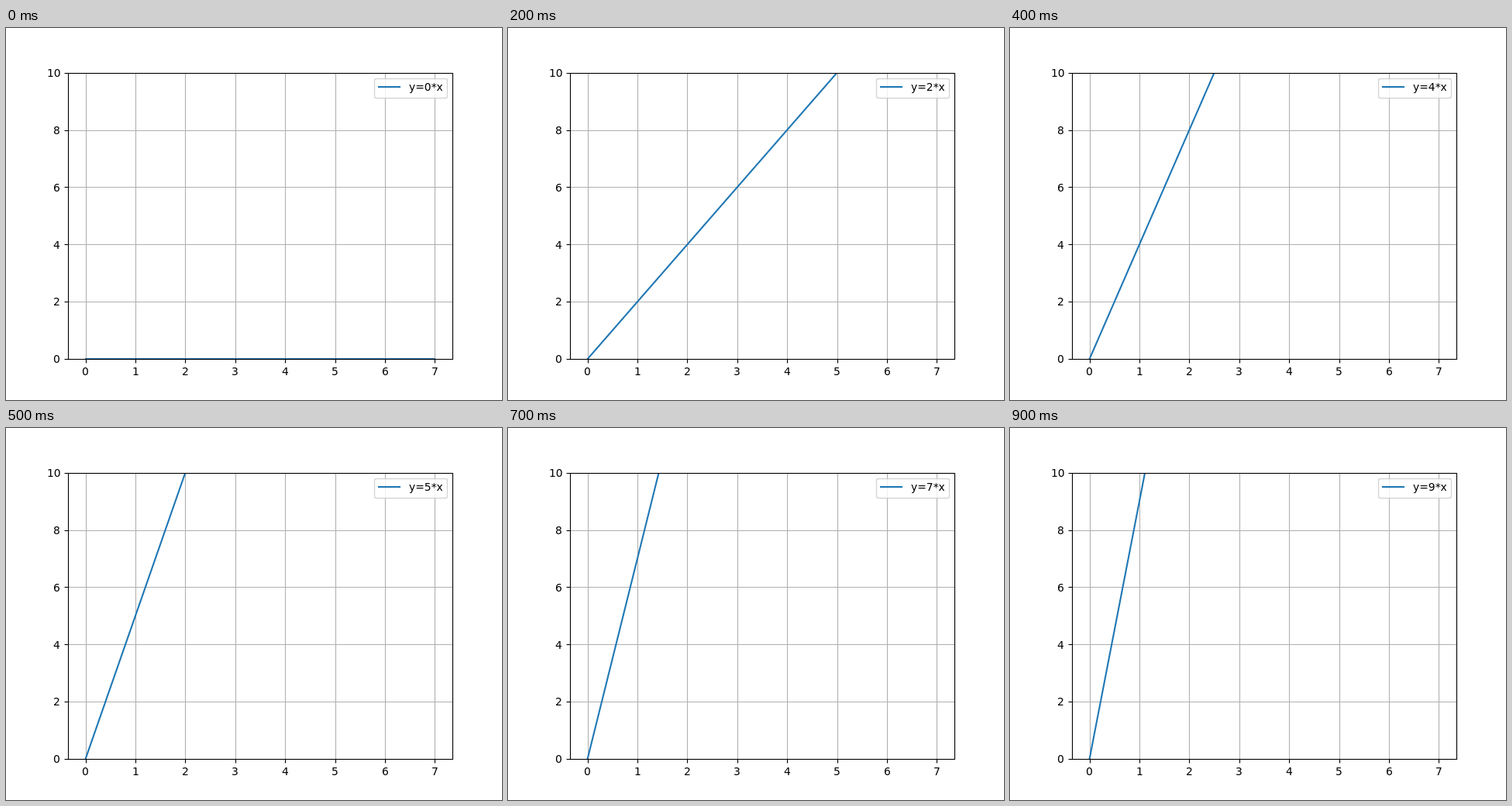
An HTML page with a canvas that plays this animation: 640x480 px, repeating every 1000 ms.

```html
<!DOCTYPE html>
<html lang="en">
<head>
<meta charset="utf-8">
<title>Slope of a line</title>
<style>
  html, body { margin: 0; width: 100%; height: 100%; overflow: hidden; background: #fff; }
  canvas { display: block; }
</style>
</head>
<body>
<canvas id="plot" width="640" height="480"></canvas>
<script>
const ctx = document.getElementById('plot').getContext('2d');
const PT = 100 / 72;
const STEP = 100, SLOPES = 10;
const BLUE = '#1f77b4';
const box = { left: 80, right: 576, top: 57.6, bottom: 427.2 };

const px = x => box.left + (x + 0.35) / 7.7 * (box.right - box.left);
const py = y => box.bottom - y / 10 * (box.bottom - box.top);
const snap = v => Math.round(v) + 0.5;

function line(x1, y1, x2, y2, color, width, cap = 'butt') {
  ctx.strokeStyle = color;
  ctx.lineWidth = width * PT;
  ctx.lineCap = cap;
  ctx.beginPath();
  ctx.moveTo(x1, y1);
  ctx.lineTo(x2, y2);
  ctx.stroke();
}

function text(str, x, y) {
  ctx.fillStyle = '#000';
  ctx.fillText(str, Math.round(x), Math.round(y));
}

function clipToAxes(draw) {
  ctx.save();
  ctx.beginPath();
  ctx.rect(80, 58, 497, 370);
  ctx.clip();
  draw();
  ctx.restore();
}

function grid() {
  for (let x = 0; x <= 7; x++) line(snap(px(x)), 58, snap(px(x)), 428, '#b0b0b0', 0.8);
  for (let y = 0; y <= 10; y += 2) line(80, snap(py(y)), 577, snap(py(y)), '#b0b0b0', 0.8);
}

function graph(k) {
  if (k === 0) line(Math.round(px(0)), 427, Math.round(px(7)), 427, BLUE, 1.5, 'square');
  else line(px(0), py(0), px(7), py(7 * k), BLUE, 1.5, 'square');
}

function axes() {
  for (let x = 0; x <= 7; x++) {
    line(snap(px(x)), 427.5, snap(px(x)), 432.5, '#000', 0.8);
    text(x, px(x) - ctx.measureText(x).width / 2, 448);
  }
  for (let y = 0; y <= 10; y += 2) {
    line(75.5, snap(py(y)), 80.5, snap(py(y)), '#000', 0.8);
    text(y, 70.28 - ctx.measureText(y).width, py(y) + 5.2);
  }
  ctx.strokeStyle = '#000';
  ctx.lineWidth = 0.8 * PT;
  ctx.strokeRect(80.5, 58.5, 496, 369);
}

function legend(k) {
  ctx.globalAlpha = 0.8;
  ctx.beginPath();
  ctx.roundRect(475.5, 65.5, 94, 25, 2.5);
  ctx.fillStyle = '#fff';
  ctx.fill();
  ctx.strokeStyle = '#ccc';
  ctx.lineWidth = PT;
  ctx.stroke();
  ctx.globalAlpha = 1;
  line(481, 76, 508, 76, BLUE, 1.5, 'square');
  text(`y=${k}*x`, 519.6, 81);
}

function frame(now) {
  const k = Math.floor(now / STEP) % SLOPES;
  ctx.fillStyle = '#fff';
  ctx.fillRect(0, 0, 640, 480);
  ctx.font = `${10 * PT}px "DejaVu Sans", sans-serif`;
  clipToAxes(() => { grid(); graph(k); });
  axes();
  legend(k);
}

const start = performance.now();
function tick() {
  frame(performance.now() - start);
  requestAnimationFrame(tick);
}
tick();
</script>
</body>
</html>
```
